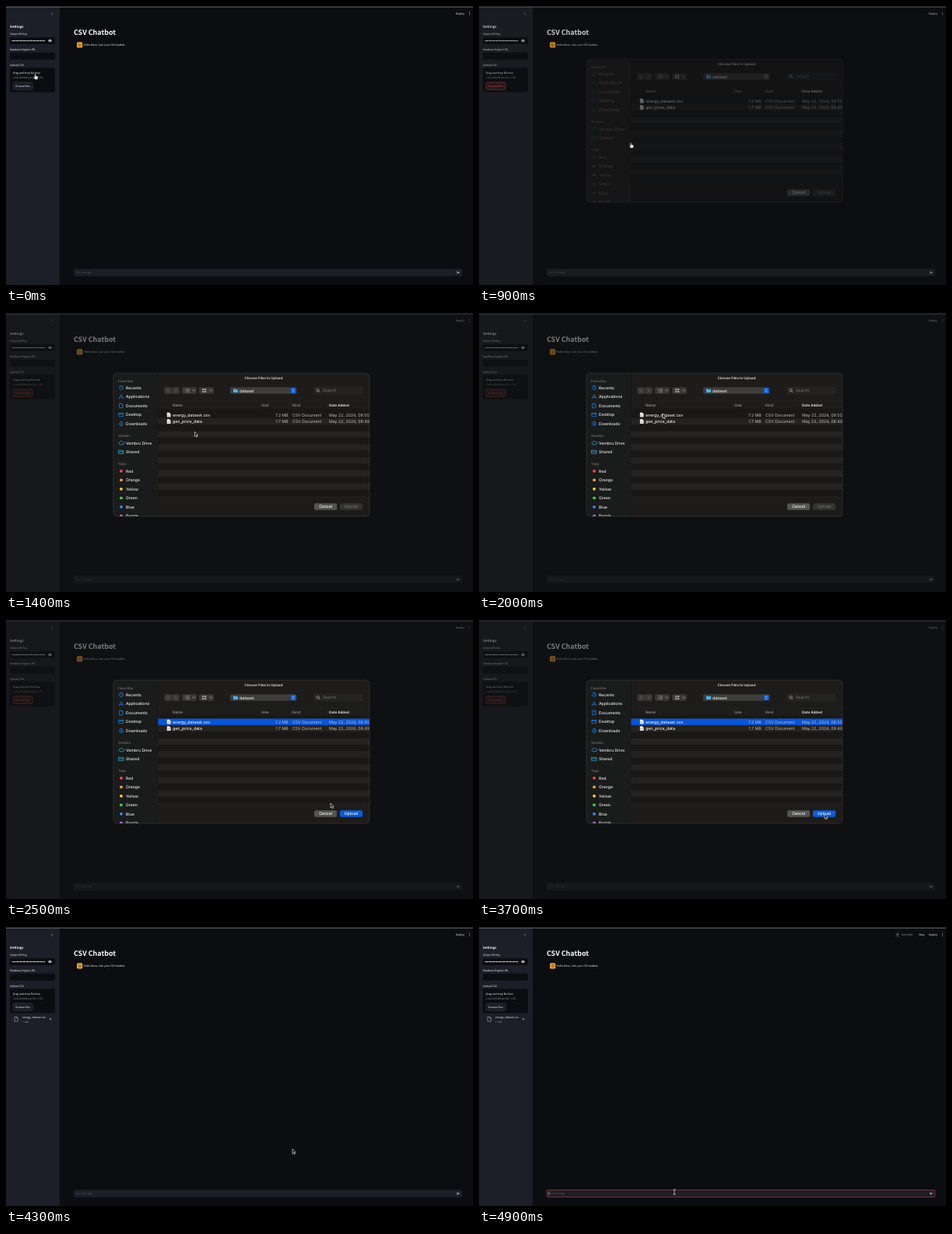
These frames come from a looping animation (600 px wide and 358 px high, 5000 ms). An HTML page:

```html
<!DOCTYPE html>
<html lang="en">
<head>
<meta charset="utf-8">
<title>CSV Chatbot</title>
<style>
  html, body { margin: 0; width: 100%; height: 100%; overflow: hidden; background: #0b0d11; }
  svg { display: block; width: 600px; height: 358px; }
  text { text-rendering: geometricPrecision; white-space: pre; }
  .page { font-family: "Noto Sans CJK JP", "Noto Sans CJK SC", "Noto Sans CJK", "Noto Sans", sans-serif; font-weight: 500; }
  .dialog { font-family: Inter, Roboto, sans-serif; }
  .browse rect { fill: #1a1d25; stroke: #44464f; }
  .browse text { fill: #fafafa; }
  .browse.hot rect { fill: #2a1a20; stroke: #d8444a; }
  .browse.hot text { fill: #ff4b4b; }
  .inactive .items { opacity: .36; }
  .inactive .side { fill: #252420; }
  .inactive .arrows { fill: #4a4a4a; }
  .row { fill: none; }
  .picked .row { fill: #0a55d4; }
  .picked.inactive .row { fill: #4a4a4a; }
  .upload rect { fill: #333332; }
  .upload text { fill: #747474; }
  .picked .upload rect { fill: #0c5bd8; }
  .picked .upload text { fill: #fff; }
  .picked.inactive .upload rect { fill: #444; }
</style>
</head>
<body>
<svg id="stage" viewBox="0 0 600 358"></svg>
<script>
const NS = "http://www.w3.org/2000/svg";
const stage = document.getElementById("stage");

function add(parent, tag, attrs = {}, content) {
  const el = document.createElementNS(NS, tag);
  for (const key in attrs) el.setAttribute(key, attrs[key]);
  if (content) el.textContent = content;
  parent.appendChild(el);
  return el;
}
const group = (parent, cls) => add(parent, "g", cls ? { class: cls } : {});
const box = (parent, x, y, width, height, fill, rx = 0, more = {}) =>
  add(parent, "rect", { x, y, width, height, fill, rx, ...more });
const line = (parent, d, stroke, width = 0.6, more = {}) =>
  add(parent, "path", { d, fill: "none", stroke, "stroke-width": width, "stroke-linecap": "round", "stroke-linejoin": "round", ...more });
const shape = (parent, d, fill, more = {}) => add(parent, "path", { d, fill, ...more });
const dot = (parent, cx, cy, r, fill) => add(parent, "circle", { cx, cy, r, fill });
// Text is placed by the middle of its capitals.
const label = (parent, x, mid, str, size, fill, more = {}) =>
  add(parent, "text", { x, y: mid + size * 0.365, "font-size": size, fill, ...more }, str);

const BG = "#0b0d11", PANEL = "#1c1f27", WHITE = "#fafafa";
const BOLD = { "font-weight": 700 }, SEMI = { "font-weight": 600 }, MEDIUM = { "font-weight": 500 };

// ---- Web page ----
const page = group(stage, "page");
box(page, 0, 0, 600, 358, BG);
box(page, 0, 0, 69, 358, PANEL);
box(page, 0, 0, 600, 0.8, "#08090b");
box(page, 0, 0.8, 600, 0.9, "#6b6c70");

line(page, "M59.6 8.9L58.5 10.1L59.6 11.3", "#d5d5d8", 0.5);
label(page, 5, 26.8, "Settings", 4.3, WHITE, BOLD);
label(page, 5, 36.2, "Zelqor API Key", 3.3, WHITE);
box(page, 5, 40, 58, 9, BG, 1.6);
line(page, "M8 44.6H50.8", WHITE, 1.15, { "stroke-dasharray": "0 1.3" });
shape(page, "M54.2 44.5Q56.5 41.2 58.8 44.5Q56.5 47.8 54.2 44.5Z", WHITE);
dot(page, 56.5, 44.5, 0.9, BG);
dot(page, 56.5, 44.5, 0.45, WHITE);
label(page, 5, 56, "Database Engine URL", 3.3, WHITE);
box(page, 5, 59.8, 58, 9, BG, 1.6);
label(page, 5, 75.7, "Upload CSV", 3.3, WHITE);
box(page, 5, 79.2, 58, 31.4, BG, 1.6);
label(page, 9, 85.9, "Drag and drop file here", 3.3, WHITE);
label(page, 9, 92.1, "Limit 200MB per file • CSV", 3.25, "#8d8f95");
const browse = group(page, "browse");
box(browse, 9, 98, 25.2, 9.3, PANEL, 1.6, { "stroke-width": 0.5 });
label(browse, 21.6, 102.6, "Browse files", 3.35, WHITE, { "text-anchor": "middle" });

const file = group(page);
line(file, "M11.4 115.3H13.8L15.3 116.9V121.1H11.4ZM13.7 115.4V117H15.2", "#d5d5d8", 0.45);
label(file, 21, 116.2, "energy_dataset.csv", 3.3, WHITE);
label(file, 21, 121.6, "7.2MB", 3, "#8d8f95");
line(file, "M56.2 117.3L57.8 118.9M57.8 117.3L56.2 118.9", "#e5e5e8", 0.5);

label(page, 87, 33.9, "CSV Chatbot", 8.95, WHITE, BOLD);
box(page, 91, 46.2, 7.3, 7.3, "#f2a431", 1.6);
add(page, "circle", { cx: 94.65, cy: 49.9, r: 1.7, fill: "none", stroke: "#6b4410", "stroke-width": 0.7 });
dot(page, 94.65, 49.9, 0.5, "#6b4410");
label(page, 100, 50, "Hello there, I am your CSV chatbot.", 3.3, WHITE);

label(page, 578, 9.8, "Deploy", 3.4, WHITE);
for (const y of [8.5, 9.9, 11.3]) dot(page, 595.7, y, 0.45, WHITE);
const running = group(page);
dot(running, 538.3, 7.9, 0.55, "#9a9ca3");
line(running, "M536.2 9.2L537.8 8.9L537.4 10.4L538.7 11.2L538.5 12.6M537.4 10.4L536.6 11.7L535.6 11.9M538 9.2L539.5 9.9", "#9a9ca3", 0.45);
label(running, 543, 9.8, "RUNNING...", 3.15, "#8d8f95");
label(running, 565, 9.8, "Stop", 3.4, WHITE);

box(page, 87, 337.2, 499, 9.6, PANEL, 1.6);
label(page, 89.4, 342, "Your message", 3.25, "#54565e");
shape(page, "M579 340.2L583.4 342L579 343.8L579.5 342.3L581.3 342L579.5 341.7Z", "#a3a5ab");
const focus = group(page);
box(focus, 87.2, 337.4, 498.6, 9.2, "none", 1.6, { stroke: "#c8413f", "stroke-width": 0.6 });
line(focus, "M89.8 339.9V344", WHITE, 0.5);

const scrim = box(stage, 0, 0, 600, 358, "#131313");

// ---- File dialog ----
const clip = add(add(stage, "defs"), "clipPath", { id: "frame" });
box(clip, 138, 77.2, 329, 183.8, "#000", 4.5);
const dialog = group(stage, "dialog");
const body = add(dialog, "g", { "clip-path": "url(#frame)" });
box(body, 138, 77, 329, 185, "#1d1c1a");
box(body, 138, 77, 57, 185, "#1a1b1b", 0, { class: "side" });
box(body, 195, 77, 0.4, 185, "#111");

const heading = (y, str) => label(body, 144, y, str, 4.35, "#6c6c68", SEMI);
heading(87, "Favorites");
heading(157.4, "Vembru");
heading(193.8, "Tags");

const items = group(body, "items");
const icons = {
  Recents: "M148 93.1A2.7 2.7 0 1 0 148.01 93.1M148 94.3V96L149.1 96.6",
  Applications: "M145.4 109.7L148 104.8L150.6 109.7M146 108.3H150",
  Documents: "M145.9 116.2H148.8L150.1 117.6V121.7H145.9ZM148.7 116.3V117.8H150",
  Desktop: "M145.2 128.4H150.8V132.6H145.2ZM145.3 129.6H150.7",
  Downloads: "M148 139.3A2.7 2.7 0 1 0 148.01 139.3M148 140.6V143.2M147 142.3L148 143.3L149 142.3",
  "Vembru Drive": "M146.3 168.7A1.6 1.6 0 0 1 146.2 165.6A2.1 2.1 0 0 1 150 165.5A1.6 1.6 0 0 1 150.3 168.7Z",
  Shared: "M145 176H147.2L147.9 176.7H151V180.4H145ZM145.1 178H150.9"
};
const places = [96, 107.4, 119, 130.5, 142, 166.8, 178];
Object.keys(icons).forEach((name, i) => {
  line(items, icons[name], i < 5 ? "#1787f0" : "#2fb4dc", 0.7);
  label(items, 154, places[i], name, 5.1, "#f0f0ee", MEDIUM);
});
const tags = { Red: "#ff4b48", Orange: "#ff9a48", Yellow: "#ffd426", Green: "#48d03c", Blue: "#3f8cff", Purple: "#c069e8" };
Object.keys(tags).forEach((name, i) => {
  const y = 202.8 + i * 11.5;
  dot(items, 148, y, 1.9, tags[name]);
  label(items, 154, y, name, 5.1, "#f0f0ee", MEDIUM);
});

label(body, 331, 83.8, "Choose Files to Upload", 4.4, "#e4e4e2", { "text-anchor": "middle", ...SEMI });
box(body, 203.5, 95.3, 9.4, 8.4, "#3a3a38", 1.6);
box(body, 213.3, 95.3, 9.4, 8.4, "#3a3a38", 1.6);
line(body, "M208.8 97.9L207.4 99.5L208.8 101.1M217.3 97.9L218.7 99.5L217.3 101.1", "#757573", 0.6);
for (const x of [226, 248]) {
  box(body, x, 95.3, 19, 8.4, "#383836", 1.6);
  line(body, `M${x + 13.6} 98.9L${x + 15} 100.2L${x + 16.4} 98.9`, "#c4c4c2", 0.6);
}
line(body, "M230.3 97.7H230.4M230.3 99.5H230.4M230.3 101.3H230.4M232 97.7H235.6M232 99.5H235.6M232 101.3H235.6", "#b8b8b6", 0.55);
for (const x of [252, 255]) for (const y of [97, 99.8]) box(body, x, y, 2.3, 2.1, "#a0a09e", 0.3);

box(body, 288, 95.3, 85.4, 8.5, "#3d3d3b", 1.8);
shape(body, "M292 97.2H294.2L294.9 97.9H298V101.9H292Z", "#4aaeea");
label(body, 300, 99.6, "dataset", 5.25, "#eeeeec", MEDIUM);
box(body, 365.6, 96.1, 6.9, 6.9, "#0c5bd8", 1.5, { class: "arrows" });
line(body, "M367.9 98.8L369 97.6L370.1 98.8M367.9 100.4L369 101.6L370.1 100.4", "#fff", 0.6);

box(body, 395.3, 95.3, 62.6, 8.5, "#232322", 1.8, { stroke: "#343433", "stroke-width": 0.4 });
add(body, "circle", { cx: 400.6, cy: 99.1, r: 1.7, fill: "none", stroke: "#d0d0ce", "stroke-width": 0.6 });
line(body, "M401.9 100.4L403.2 101.7", "#d0d0ce", 0.6);
label(body, 407, 99.6, "Search", 5.2, "#777775");

for (const [x, str] of [[214, "Name"], [328, "Size"], [368, "Kind"]]) label(body, x, 118.2, str, 4.7, "#b4b4b2");
label(body, 415, 118.2, "Date Added", 4.55, "#f2f2f0", SEMI);
box(body, 195.4, 112.8, 272, 0.4, "#2d2d2c");
for (const x of [325, 365, 412]) box(body, x, 115, 0.4, 6.5, "#343433");

const ROW = 8.35, TOP = 126.5;
box(body, 195.4, 123.2, 272, 112.8, "#191816");
for (let i = 1; i < 13; i += 2) box(body, 195.4, TOP + i * ROW, 272, ROW, "#242320");
box(body, 195.4, TOP, 272, ROW, "none", 0, { class: "row" });
const files = [["energy_dataset.csv", "7.2 MB", "08:50"], ["gen_price_data", "1.7 MB", "08:49"]];
files.forEach(([name, size, time], i) => {
  const y = TOP + (i + 0.5) * ROW, grey = "#c2c2c0";
  shape(body, `M206.8 ${y - 2.9}H209.8L211.6 ${y - 1.1}V${y + 2.9}H206.8Z`, "#f0f0ee");
  line(body, `M208 ${y + 0.2}H210.4M208 ${y + 1.5}H210.4`, "#8a8a88", 0.45);
  label(body, 214, y, name, 5.2, "#f4f4f2", MEDIUM);
  label(body, 362.6, y, size, 5.2, grey, { "text-anchor": "end" });
  label(body, 368, y, "CSV Document", 5.2, grey);
  label(body, 415, y, "May 22, 2024, " + time, 5.25, grey);
});
box(body, 195.4, 235.8, 272, 26, "#1d1c1a");
box(body, 195.4, 235.8, 272, 0.4, "#2d2d2c");

function button(x, str, cls) {
  const g = group(body, cls);
  box(g, x, 244.2, 29.2, 8.6, "#545452", 1.8);
  label(g, x + 14.6, 248.5, str, 5.1, "#fff", { "text-anchor": "middle", ...MEDIUM });
}
button(396, "Cancel", "cancel");
button(428.9, "Upload", "upload");
box(dialog, 138, 77.2, 329, 183.8, "none", 4.5, { stroke: "#454544", "stroke-width": 0.5 });

// ---- Pointers, drawn with the hot spot at 0,0 ----
const pointer = group(stage);
const hand = shape(pointer, "M-.7 .5Q0 -.5 .7 .5V2.6L3.1 3.2Q3.9 3.5 3.7 4.5L3.1 7.2H-.3L-2 4.7Q-2.1 3.8 -1.3 4L-.7 4.6Z", "#fff", { stroke: "#000", "stroke-width": 0.5 });
const arrow = shape(pointer, "M0 0V6L1.4 4.8L2.3 6.9L3.3 6.4L2.4 4.4H4.2Z", "#050505", { stroke: "#fff", "stroke-width": 0.6, "stroke-linejoin": "round" });
const beam = line(pointer, "M-1.3 -3.2Q0 -3.2 0 -2.4Q0 -3.2 1.3 -3.2M0 -2.4V2.4M-1.3 3.2Q0 3.2 0 2.4Q0 3.2 1.3 3.2", "#e8e8e8", 0.7);

// ---- Timeline ----
const LOOP = 5000, STEP = 100;
const pointerPath = [ // time, x, y
  [0, 37.5, 87], [100, 32, 88.5], [600, 32, 88.5], [700, 26, 101], [1000, 254.2, 201],
  [1400, 242.5, 152.3], [1700, 236, 129], [2100, 236, 129], [2500, 417, 235],
  [2900, 444, 249], [4000, 444, 249], [4700, 251, 340]
];
const sheetPath = [ // time, opacity, offset, dimming
  [800, 0, -12, 0], [900, 0.4, -9, 0.22], [1000, 1, -4.3, 0.42], [1100, 1, -1.2, 0.5], [1200, 1, 0, 0.55],
  [3700, 1, 0, 0.55], [3800, 0.6, -5, 0.33], [3900, 0.13, -11.5, 0.06], [4000, 0, -13, 0]
];

function sample(path, t) {
  const next = path.findIndex(k => k[0] > t);
  if (next === 0) return path[0].slice(1);
  if (next < 0) return path[path.length - 1].slice(1);
  const a = path[next - 1], b = path[next];
  const p = (t - a[0]) / (b[0] - a[0]), e = p * p * (3 - 2 * p);
  return a.slice(1).map((v, i) => v + (b[i + 1] - v) * e);
}
const show = (el, on) => el.setAttribute("visibility", on ? "visible" : "hidden");

function draw(t) {
  const [x, y] = sample(pointerPath, t);
  pointer.setAttribute("transform", `translate(${x} ${y})`);
  show(hand, t < 1200);
  show(arrow, t >= 1200 && t < 4700);
  show(beam, t >= 4700);

  const [alpha, offset, dim] = sample(sheetPath, t);
  dialog.setAttribute("opacity", alpha);
  dialog.setAttribute("transform", `translate(0 ${offset})`);
  scrim.setAttribute("opacity", dim);
  dialog.classList.toggle("inactive", t < 1300 || t >= 3800);
  dialog.classList.toggle("picked", t >= 2100);

  browse.classList.toggle("hot", t >= 700 && t < 4200);
  show(file, t >= 4200);
  show(running, t >= 4400);
  show(focus, t >= 4800);
}

const start = performance.now();
function tick() {
  const t = (performance.now() - start) % LOOP;
  draw(Math.floor(t / STEP) * STEP);
  requestAnimationFrame(tick);
}
draw(0);
requestAnimationFrame(tick);
</script>
</body>
</html>
```
